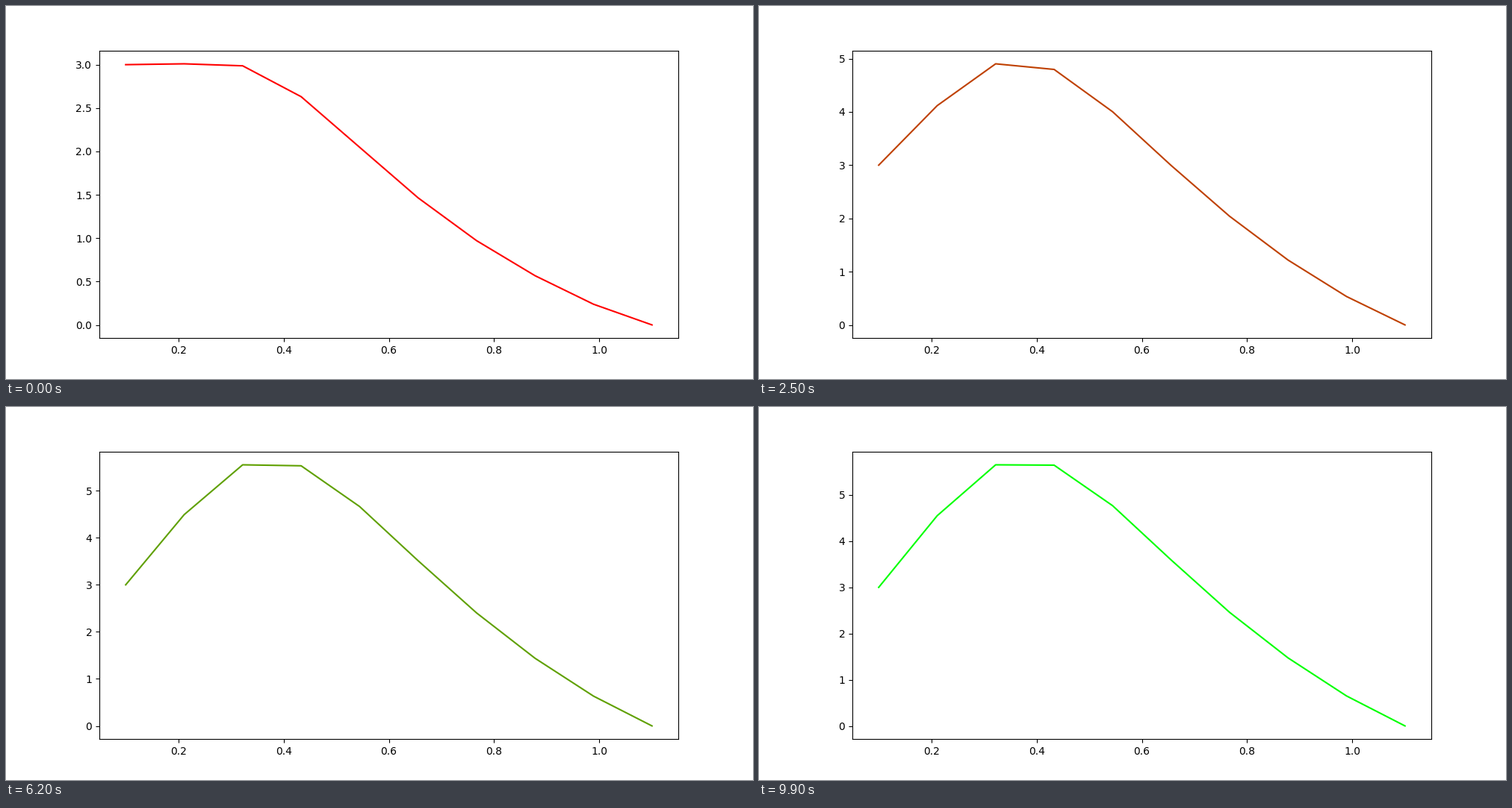
These frames come from a looping animation (1000x500 px, 10000 ms). A matplotlib script:

```python
import matplotlib.pyplot as plt
import numpy as np
from matplotlib.animation import FuncAnimation

FRAMES = 100
INTERVAL = 100
DECAY = 0.05
LEFT = 3.0
LAST = 9

u = np.arange(LAST + 1)
x = 0.1 + u / LAST


def hump(a, b, c):
    """Skewed bump that is zero at both ends."""
    return u * (LAST - u) / (a + b * u + c * u**2)


# Steady profile and the slow mode that decays towards it
steady = LEFT * (1 - u / LAST)**1.2 + hump(4.807, -1.064, 0.3436)
mode = hump(5.75, -0.925, 0.328)


def profile(n):
    return steady - mode * np.exp(-DECAY * n)


fig, ax = plt.subplots(figsize=(10, 5), dpi=100)
line, = ax.plot(x, profile(0), color=(1, 0, 0), lw=1.5)


def update(n):
    mix = n / (FRAMES - 1)
    line.set_ydata(profile(n))
    line.set_color((1 - mix, mix, 0))
    ax.relim()
    ax.autoscale_view()
    return line,


anim = FuncAnimation(fig, update, frames=FRAMES, interval=INTERVAL,
                     init_func=lambda: update(0), repeat=True, repeat_delay=0)
plt.show()
```
